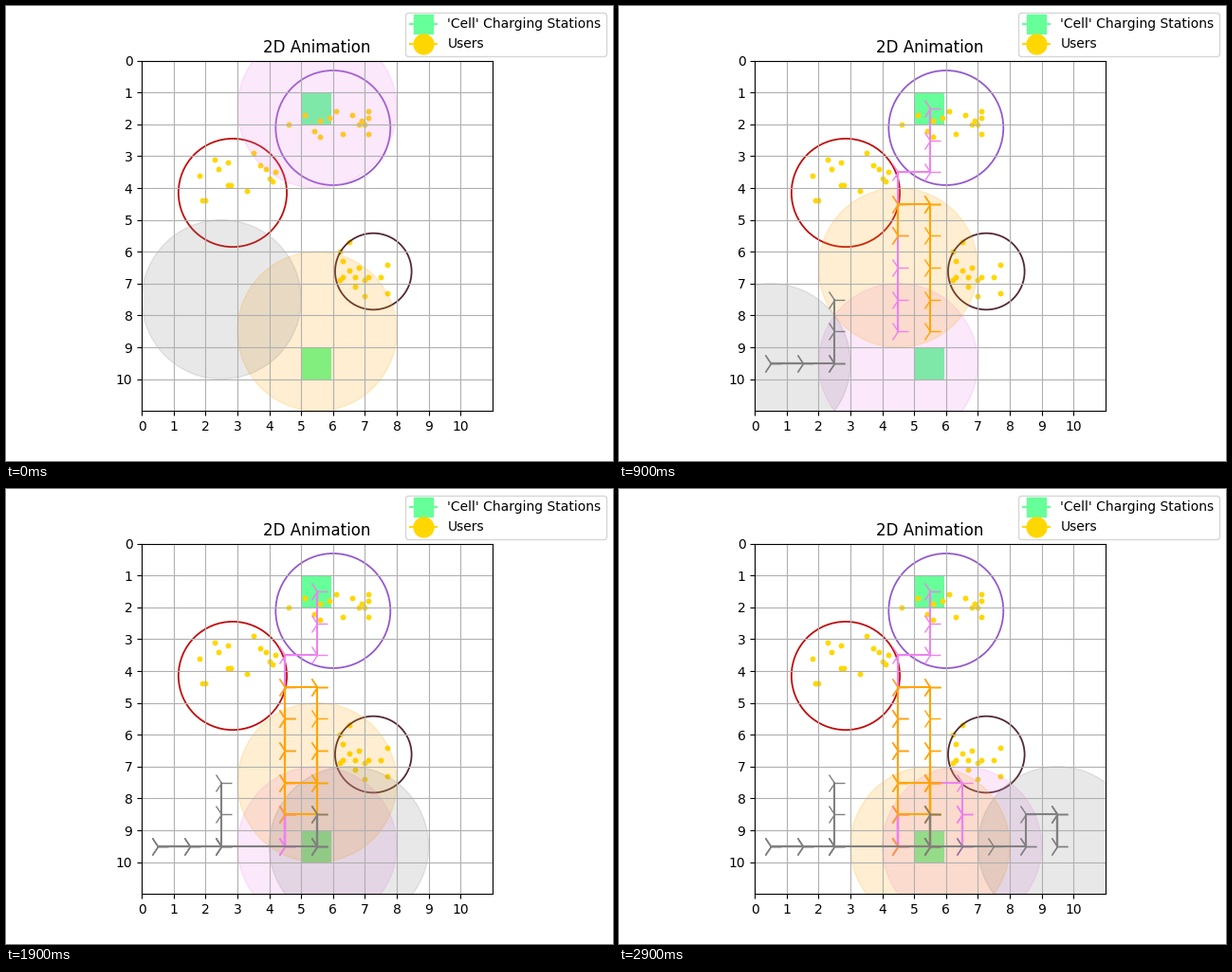
Recreate the animation shown at these times as a matplotlib script. Size 640 by 480 pixels, loop 3 s.

```python
import numpy as np
import matplotlib.pyplot as plt
from matplotlib.animation import FuncAnimation
from matplotlib.lines import Line2D
from matplotlib.patches import Circle, Rectangle

GREEN, GOLD = "#66ff99", "#ffd700"
STEPS = 30
REACH = 2.5
USERS_PER_GROUP = 15

# One letter per step; J is the jump to the charging station.
MOVES = {"U": (0, -1), "D": (0, 1), "L": (-1, 0), "R": (1, 0),
         ".": (0, 0), "J": (3, 0)}
DRONES = [
    ("violet", (5.5, 1.5), "DDLDDDDDD.UDUDUDUDRUURDDUD.UD"),
    ("orange", (5.5, 8.5), "UUUU..LDDUDDDRUUDLRDUDDLRUDUD"),
    ("gray", (2.5, 7.5), "DD..LLRL.RRJUD.UD.RRR.URDUDUD"),
]

# Circle center, radius and color, then the corners of the users' area.
GROUPS = [
    ((6.0, 2.11), 1.8, (0.58, 0.35, 0.80), (4.0, 1.5), (7.2, 2.4)),
    ((2.85, 4.15), 1.7, (0.75, 0.05, 0.04), (1.2, 2.8), (4.3, 4.5)),
    ((7.265, 6.62), 1.2, (0.33, 0.16, 0.20), (6.1, 5.6), (7.9, 7.5)),
]


def walk(start, moves):
    steps = [start] + [MOVES[m] for m in moves]
    return np.cumsum(steps, axis=0)


rng = np.random.default_rng(4)
fig, ax = plt.subplots(figsize=(6.4, 4.8), dpi=100)
ax.set_aspect("equal")
ax.set_xlim(0, 11)
ax.set_ylim(11, 0)
ax.set_xticks(range(11))
ax.set_yticks(range(11))
ax.grid(True)
ax.set_title("2D Animation")

for corner in [(5, 1), (5, 9)]:
    ax.add_patch(Rectangle(corner, 0.95, 1, facecolor=GREEN,
                           edgecolor="none"))

for center, radius, color, low, high in GROUPS:
    users = rng.uniform(low, high, (USERS_PER_GROUP, 2)).round(1)
    ax.scatter(*users.T, s=18, color=GOLD, linewidths=0, zorder=1)
    ax.add_patch(Circle(center, radius, fill=False, edgecolor=color,
                        linewidth=1.3))

drones = []
for color, start, moves in DRONES:
    area = ax.add_patch(Circle(start, REACH, color=color, alpha=0.18))
    trail, = ax.plot([], [], color=color, marker="4", markersize=16)
    drones.append((walk(start, moves), area, trail))

fig.legend(handles=[
    Line2D([], [], color=GREEN, marker="s", markersize=15,
           label="'Cell' Charging Stations"),
    Line2D([], [], color=GOLD, marker="o", markersize=15, label="Users"),
])


def update(step):
    for path, area, trail in drones:
        area.center = tuple(path[step])
        trail.set_data(path[:step, 0], path[:step, 1])
    return [artist for _, *pair in drones for artist in pair]


anim = FuncAnimation(fig, update, frames=STEPS, interval=100, repeat=True)
plt.show()
```
